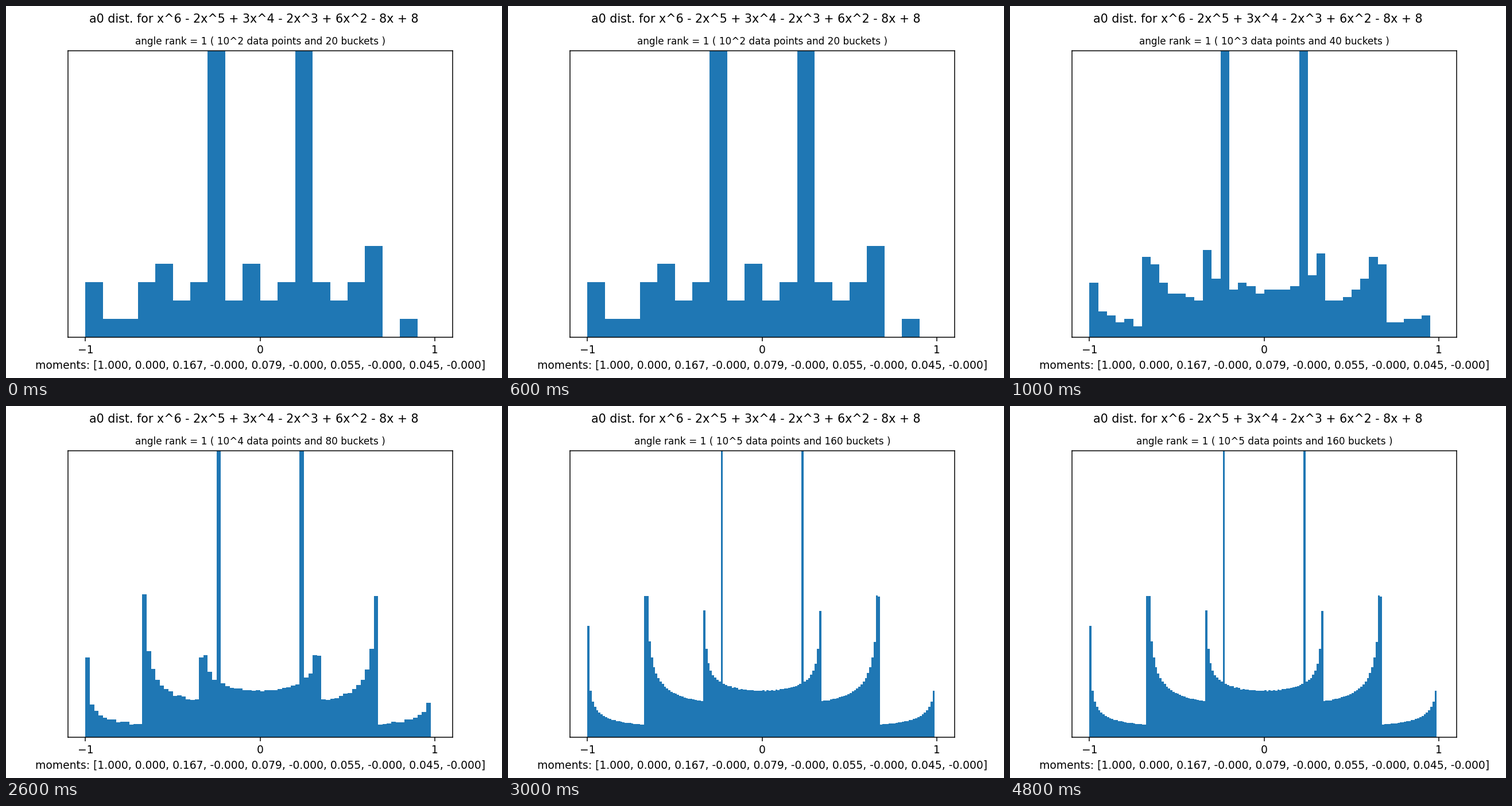
Write a matplotlib script that moves like this. It is 864 by 648 pixels and loops after 6000 ms.

```python
import numpy as np
import matplotlib.pyplot as plt
from matplotlib.animation import FuncAnimation

POLYNOMIAL = "x^6 - 2x^5 + 3x^4 - 2x^3 + 6x^2 - 8x + 8"
MOMENTS = "1.000, 0.000, 0.167, -0.000, 0.079, -0.000, 0.055, -0.000, 0.045, -0.000"
STEPS = 4
HOLD = 2  # extra seconds on the last step

plt.rcParams["font.family"] = "DejaVu Sans"


def traces(count):
    """Normalised traces of the first powers of the Frobenius roots."""
    n = np.arange(1, count + 1)
    theta = np.arccos(np.sqrt(3 / 8))
    paired = np.where(n % 2 == 0, 2 * np.cos(n * theta), 0)
    return (np.cos(n * np.pi / 4) + paired) / 3


fig, ax = plt.subplots(figsize=(6.4, 4.8), dpi=135)
fig.suptitle(f"a0 dist. for {POLYNOMIAL}", fontsize=11)


def draw(second):
    step = min(second, STEPS - 1)
    power, buckets = step + 2, 20 * 2 ** step
    ax.clear()
    ax.hist(traces(10 ** power), bins=np.arange(-1, 1, 2 / buckets), density=True)
    ax.set(xlim=(-1.1, 1.1), ylim=(0, 1.6), xticks=[-1, 0, 1], yticks=[])
    ax.set_title(f"angle rank = 1 ( 10^{power} data points and {buckets} buckets )",
                 fontsize=9)
    ax.set_xlabel(f"moments: [{MOMENTS}]", fontsize=10)


animation = FuncAnimation(fig, draw, frames=STEPS + HOLD, interval=1000, repeat=True)
plt.show()
```
